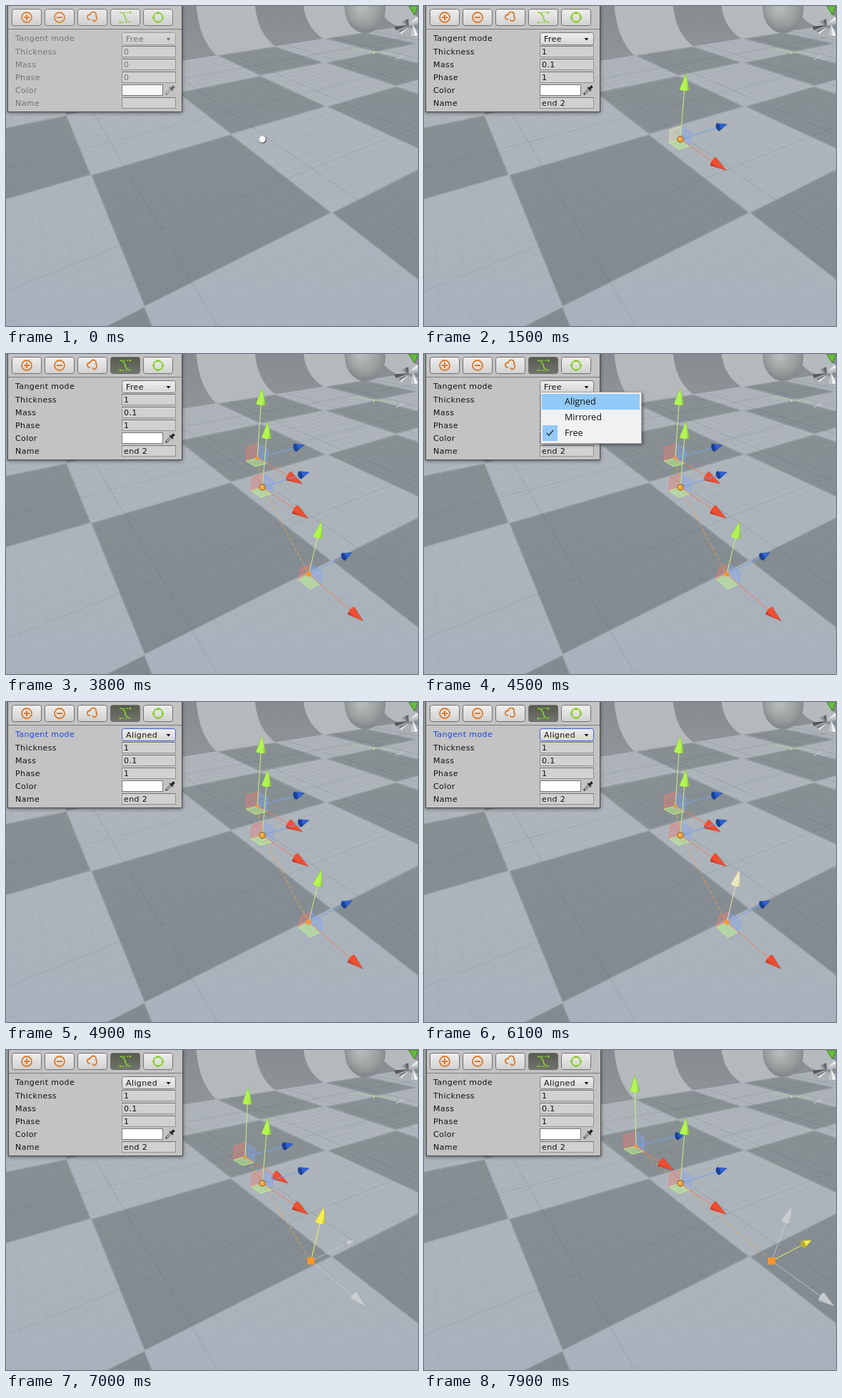
These frames come from a looping animation (577x449 px, 8 s). An HTML page with a canvas:

```html
<!DOCTYPE html>
<html lang="en">
<head>
<meta charset="utf-8">
<title>Curve editor</title>
<style>
html, body { margin: 0; width: 100%; height: 100%; overflow: hidden; background: #a9b1b9; }
canvas { display: block; }
</style>
</head>
<body>
<canvas id="stage" width="577" height="449"></canvas>
<script>
const W = 577, H = 449, LOOP = 8000;
const stage = document.getElementById('stage').getContext('2d');
let c = stage;

const UI = '"DejaVu Sans", Verdana, sans-serif';
const MENU = '"Open Sans", "Noto Sans", sans-serif';
const ORANGE = '#d87a2c', GREEN = '#86cf2c';
const AXES = {
  r: { line: '#f5785a', cone: '#f04e32', dark: '#a83420', plane: '250,120,110' },
  g: { line: '#c4f57c', cone: '#b2f552', dark: '#7cb83a', plane: '190,245,145' },
  b: { line: '#74a2f0', cone: '#2e62dc', dark: '#1c4296', plane: '130,165,250' }
};
const PALE = { line: '#ece7ae', cone: '#ebe8c0', dark: '#b4b292' };
const PICKED = { line: '#f7f05a', cone: '#f7f04a', dark: '#b8b030' };
const IDLE = { line: 'rgba(205,210,215,.75)', cone: 'rgba(204,208,212,.9)', dark: 'rgba(170,175,180,.9)' };

function poly(pts, fill, stroke, width = 1) {
  c.beginPath();
  pts.forEach(p => c.lineTo(p[0], p[1]));
  if (pts.length > 2) c.closePath();
  if (fill) { c.fillStyle = fill; c.fill(); }
  if (stroke) { c.strokeStyle = stroke; c.lineWidth = width; c.stroke(); }
}
function line(a, b, color, width = 1) { poly([a, b], null, color, width); }
function disc(x, y, r, fill, stroke, width = 1) {
  c.beginPath();
  c.arc(x, y, r, 0, 7);
  if (fill) { c.fillStyle = fill; c.fill(); }
  if (stroke) { c.strokeStyle = stroke; c.lineWidth = width; c.stroke(); }
}
function text(s, x, y, color, size = 11, font = UI, spacing = .4) {
  c.font = size + 'px ' + font;
  c.letterSpacing = spacing + 'px';
  c.fillStyle = color;
  c.fillText(s, x, y);
}
function shade(y0, y1, a, b) {
  const g = c.createLinearGradient(0, y0, 0, y1);
  g.addColorStop(0, a);
  g.addColorStop(1, b);
  return g;
}

// ---- floor and backdrop ----
function floor(u, v) {
  const w = Math.max(.02, 1 + .2306 * u - .376 * v);
  return [(119 + 268.64 * u + 2.05 * v) / w, (237 - 15.49 * u + 26.3 * v) / w];
}
function wallStrip(u, fill) {
  const [ax, ay] = floor(u, -2), [bx, by] = floor(u + 1, -2);
  c.beginPath();
  c.moveTo(ax, ay);
  c.quadraticCurveTo(ax - 24, ay * .68, ax - 28, 0);
  c.lineTo(bx - 28, 0);
  c.quadraticCurveTo(bx - 24, by * .68, bx, by);
  c.closePath();
  c.fillStyle = fill;
  c.fill();
}
function spike(x, y, tx, ty, r, light, dark) {
  const a = Math.atan2(ty - y, tx - x) + Math.PI / 2;
  const dx = Math.cos(a) * r, dy = Math.sin(a) * r;
  poly([[x + dx, y + dy], [tx, ty], [x, y]], light);
  poly([[x - dx, y - dy], [tx, ty], [x, y]], dark);
}
function drawScene() {
  const dark = shade(30, 420, '#8b9295', '#818a91');
  const light = shade(30, 420, '#b0b6ba', '#a9b2bc');
  c.fillStyle = light;
  c.fillRect(0, 0, W, H);
  for (let u = -1; u < 9; u++) {
    for (let v = -2; v < 2; v++) {
      if ((u + v) % 2 === 0)
        poly([floor(u, v), floor(u + 1, v), floor(u + 1, v + 1), floor(u, v + 1)], dark);
    }
  }
  const gridLine = (i, a, b) => {
    const edge = i % 10 === 0;
    line(a, b, edge ? 'rgba(172,180,187,.4)' : 'rgba(60,72,80,.045)', edge ? 3 : 1);
  };
  for (let i = -10; i <= 80; i++) gridLine(i, floor(i / 10, -2), floor(i / 10, 2));
  for (let i = -20; i <= 20; i++) gridLine(i, floor(-1, i / 10), floor(9, i / 10));
  for (let k = -1; k < 6; k++) {
    line(floor(k + .2, -2), floor(k + .2, 2), 'rgba(60,72,80,.13)');
    if (k < 2) line(floor(-1, k - .35), floor(8, k - .35), 'rgba(60,72,80,.13)');
  }
  for (let u = 0; u < 9; u++)
    wallStrip(u, u % 2 ? shade(0, 70, '#888c91', '#8e9498') : shade(0, 70, '#b6babd', '#b2b8bc'));

  const ball = c.createRadialGradient(497, 3, 3, 503, 4, 33);
  ball.addColorStop(0, '#b4bab7');
  ball.addColorStop(.6, '#9aa09d');
  ball.addColorStop(1, '#80868a');
  c.beginPath();
  c.ellipse(503, 4, 28.5, 34, 0, 0, 7);
  c.fillStyle = ball;
  c.fill();

  line([483, 60], [546, 68], 'rgba(178,220,150,.6)');
  line([546, 75], [557, 69], '#d5dadd');
  disc(515, 66, 1.2, '#c4e8a0');

  spike(559, 20, 564, 31, 5, '#8d9194', '#5f6366');
  spike(546, 34, 564, 27, 6, '#a8abad', '#55595c');
  spike(552, 37, 566, 28, 3, '#e4e6e7', '#777b7e');
  spike(572, 42, 570, 25, 5, '#f2f3f3', '#c5c8ca');
  spike(577, 19, 566, 24, 4, '#eeeeee', '#c9cccd');
  poly([[564, 0], [577, 0], [572, 13]], '#68bd3c', '#3f7d24');
}

// ---- transform handles ----
function axesAt(x, y) {
  return {
    r: [53 + (x - 297) * .18, 36 + (y - 146) * .18],
    g: [-2 + (x - 297) * .155, -98 + (y - 146) * .148],
    b: [70 - (x - 297) * .075, -18 - (y - 146) * .075]
  };
}
function cone(tx, ty, dx, dy, len, r, round, col) {
  const d = Math.hypot(dx, dy), ux = dx / d, uy = dy / d;
  const bx = tx - ux * len, by = ty - uy * len;
  const left = [bx - uy * r, by + ux * r], right = [bx + uy * r, by - ux * r];
  const g = c.createLinearGradient(left[0], left[1], right[0], right[1]);
  g.addColorStop(0, col.dark);
  g.addColorStop(.35, col.cone);
  g.addColorStop(1, col.cone);
  poly([left, [tx, ty], right], g, col.dark, .5);
  c.beginPath();
  c.ellipse(bx, by, r * round, r, Math.atan2(uy, ux), 0, 7);
  c.fillStyle = round > .4 ? col.dark : g;
  c.fill();
}
function gizmo(x, y, { hover, picked, pale, square = 6 } = {}) {
  const ax = axesAt(x, y);
  const at = (r, g, b) => [
    x + ax.r[0] * r + ax.g[0] * g + ax.b[0] * b,
    y + ax.r[1] * r + ax.g[1] * g + ax.b[1] * b
  ];
  if (!picked) {
    const R = .21, G = .2, B = -.24, o = [x, y];
    const quads = {
      r: [o, at(0, 0, B), at(0, G, B), at(0, G, 0)],
      b: [o, at(R, 0, 0), at(R, G, 0), at(0, G, 0)],
      g: [o, at(0, 0, B), at(R, 0, B), at(R, 0, 0)]
    };
    for (const k in quads) {
      const rgb = k === pale ? '236,231,180' : AXES[k].plane;
      poly(quads[k], `rgba(${rgb},${k === 'g' ? .5 : .34})`, `rgba(${rgb},.85)`);
    }
  }
  for (const k of ['b', 'r', 'g']) {
    const [dx, dy] = ax[k];
    const col = k === picked ? PICKED : picked ? IDLE : k === hover ? PALE : AXES[k];
    line([x, y], [x + dx * .8, y + dy * .8], col.line);
    const shape = k === 'b' ? [13, 5.5, .55] : [22, 6.8, .3];
    cone(x + dx, y + dy, dx, dy, ...shape, col);
  }
  if (square) {
    const s = picked ? 10 : square;
    c.fillStyle = '#ff9426';
    c.fillRect(x - s / 2, y - s / 2, s, s);
  }
}
function dashed(x0, y0, x1, y1) {
  c.setLineDash([5, 3]);
  line([x0, y0], [x1, y1], '#f2a04c');
  c.setLineDash([]);
}

// ---- inspector panel ----
function button(x, y, w, h, top, bottom, border = '#6f6f6f') {
  c.beginPath();
  c.roundRect(x + .5, y + .5, w - 1, h - 1, 3);
  c.fillStyle = shade(y, y + h, top, bottom);
  c.fill();
  c.strokeStyle = border;
  c.lineWidth = 1;
  c.stroke();
}
function field(y, value, ink) {
  c.fillStyle = '#d1d1d1';
  c.fillRect(162.5, y + .5, 75, 15);
  c.strokeStyle = '#939393';
  c.lineWidth = 1;
  c.strokeRect(162.5, y + .5, 75, 15);
  line([162, y + .5], [238, y + .5], '#747474');
  text(value, 165, y + 12, ink);
}
const icons = [
  x => { icons[1](x); line([x, 12], [x, 20], ORANGE, 2); },
  x => { disc(x, 16, 7, null, ORANGE, 1.8); line([x - 4, 16], [x + 4, 16], ORANGE, 2); },
  x => {
    c.beginPath();
    c.moveTo(x - 3, 19);
    c.bezierCurveTo(x - 9, 19, x - 8, 12, x - 3, 12);
    c.bezierCurveTo(x - 2, 6, x + 7, 8, x + 5, 14);
    c.bezierCurveTo(x + 9, 18, x + 2, 25, x, 19);
    c.strokeStyle = ORANGE;
    c.lineWidth = 1.8;
    c.stroke();
  },
  x => {
    c.beginPath();
    c.moveTo(x - 8, 9);
    c.bezierCurveTo(x + 4, 9, x - 4, 23, x + 8, 23);
    c.strokeStyle = GREEN;
    c.lineWidth = 1.7;
    c.stroke();
    c.setLineDash([2, 2]);
    line([x - 2, 9], [x + 8, 9], GREEN, 1.5);
    line([x - 8, 23], [x + 2, 23], GREEN, 1.5);
    c.setLineDash([]);
    for (const s of [-1, 1]) disc(x + 7 * s, 16 - 7 * s, 1.6, GREEN);
  },
  x => {
    disc(x, 16, 6.5, null, GREEN, 1.8);
    for (let i = 0; i < 4; i++)
      disc(x + 6.5 * Math.cos(i * Math.PI / 2), 16 + 6.5 * Math.sin(i * Math.PI / 2), 1.8, GREEN);
  }
];
function dropper(ink) {
  line([224, 124], [232, 116], ink, 2.6);
  line([225, 123], [231, 117], '#e4e4e4', 1.3);
  line([229, 114], [234, 119], ink, 1.6);
  line([232, 116], [235.5, 112.5], ink, 3.4);
}
function drawPanel(t) {
  const on = t >= 1500, tool = t >= 2400, focus = t >= 4700 && t < 6400;
  const ink = on ? '#111' : '#737373';
  const left = t < 6400 ? 2 : 3;
  c.save();
  c.shadowColor = 'rgba(0,0,0,.5)';
  c.shadowBlur = 5;
  c.shadowOffsetY = 1;
  c.fillStyle = '#c3c3c3';
  c.fillRect(left, -6, 245, 155);
  c.restore();
  c.strokeStyle = '#4c4c4c';
  c.lineWidth = 1;
  c.strokeRect(left + .5, -5.5, 244, 154);
  line([left + 1, 32.5], [left + 244, 32.5], '#7c7c7c');

  c.globalAlpha = on ? 1 : .9;
  icons.forEach((icon, i) => {
    let fill = ['#efefef', '#d0d0d0'];
    if (i === 3 && tool) fill = ['#55594f', '#71756c'];
    else if (i === 3 && t >= 2300) fill = ['#858884', '#9da09c'];
    button(8 + 46 * i, 4, 42, 24, ...fill);
    icon(29 + 46 * i);
  });
  c.globalAlpha = 1;

  ['Tangent mode', 'Thickness', 'Mass', 'Phase', 'Color', 'Name'].forEach((s, i) =>
    text(s, 13, (i ? 50 : 49) + 18 * i, focus && !i ? '#1c45d8' : ink));
  button(162, 37, 76, 18, on ? '#f0f0f0' : '#d9d9d9', on ? '#d5d5d5' : '#cbcbcb',
    focus ? '#3a5fd0' : on ? '#777' : '#9a9a9a');
  text(t >= 4700 ? 'Aligned' : 'Free', 168, 50, ink);
  poly([[224.5, 45], [230.5, 45], [227.5, 48.5]], ink);

  const values = on ? ['1', '0.1', '1'] : ['0', '0', '0'];
  values.forEach((v, i) => field(56 + 18 * i, v, ink));
  field(128, on ? 'end 2' : '', ink);
  c.fillStyle = on ? '#fff' : '#f6f6f6';
  c.fillRect(162.5, 110.5, 57, 15);
  c.strokeStyle = '#777';
  c.strokeRect(162.5, 110.5, 57, 15);
  dropper(on ? '#222' : '#666');
}
function drawMenu(t) {
  if (t < 4300 || t >= 4900) return;
  c.save();
  c.globalAlpha = t < 4700 ? 1 : t < 4800 ? .6 : .25;
  c.save();
  c.shadowColor = 'rgba(0,0,0,.4)';
  c.shadowBlur = 4;
  c.shadowOffsetX = c.shadowOffsetY = 2;
  c.fillStyle = '#f1f1f1';
  c.fillRect(163, 53, 142, 73);
  c.restore();
  c.strokeStyle = '#a3a3a3';
  c.lineWidth = 1;
  c.strokeRect(163.5, 53.5, 141, 72);
  const row = t < 4400 ? 2 : t < 4500 ? 1 : 0;
  c.fillStyle = '#91c9f7';
  c.fillRect(165, 56 + 22 * row, 137, 22);
  c.fillRect(166, 100, 21, 22);
  ['Aligned', 'Mirrored', 'Free'].forEach((s, i) => text(s, 197, 71 + 22 * i, '#111', 12.6, MENU, 0));
  c.beginPath();
  c.moveTo(172, 111);
  c.lineTo(175, 114);
  c.lineTo(181, 107);
  c.strokeStyle = '#222';
  c.lineWidth = 1.3;
  c.stroke();
  c.restore();
}

// ---- timeline ----
// time, lower tangent x y, upper tangent x y
const POSES = [
  [0, 424, 309, 352, 146],
  [6400, 424, 307, 338, 148],
  [6500, 427, 298, 335, 150],
  [6600, 429, 289, 334, 152],
  [6700, 431, 282, 334, 155],
  [6900, 434, 268, 335, 160],
  [7000, 427, 296, 335, 150],
  [7100, 418, 333, 338, 128],
  [7800, 451, 316, 318, 131],
  [7900, 487, 296, 297, 135]
];
const within = (t, a, b) => t >= a && t < b;

function drawHandles(t) {
  const mx = 359, my = 187;
  if (t < 1500) {
    disc(mx + .7, my + .7, 5, '#3f4447');
    disc(mx, my, 4.7, '#f7f7f7');
    return;
  }
  const [, lx, ly, ux, uy] = POSES.filter(p => p[0] <= t).pop();
  const tool = t >= 2400;
  if (tool) {
    gizmo(ux, uy, {
      hover: within(t, 3300, 3500) ? 'r' : '',
      pale: within(t, 3000, 3100) ? 'r' : '',
      square: 4
    });
  }
  gizmo(mx, my, {
    hover: within(t, 3500, 3800) || within(t, 5100, 5400) ? 'r' : '',
    pale: within(t, 1500, 1700) ? 'r' : '',
    square: 0
  });
  if (tool) {
    gizmo(lx, ly, {
      hover: within(t, 5500, 6100) || within(t, 7600, 7800) ? 'b' : within(t, 6100, 6400) ? 'g' : '',
      picked: within(t, 6400, 7300) ? 'g' : t >= 7800 ? 'b' : ''
    });
    dashed(mx, my, lx, ly);
    dashed(mx, my, ux, uy);
  }
  disc(mx, my, 4.2, '#f7a436', '#8a5518', 1);
  disc(mx - 1, my - 1, 1.5, '#ffc878');
}

const scene = document.createElement('canvas');
scene.width = W;
scene.height = H;
c = scene.getContext('2d');
drawScene();
c = stage;

const start = performance.now();
function frame() {
  const t = (performance.now() - start) % LOOP;
  c.drawImage(scene, 0, 0);
  drawHandles(t);
  drawPanel(t);
  drawMenu(t);
  requestAnimationFrame(frame);
}
frame();
</script>
</body>
</html>
```
